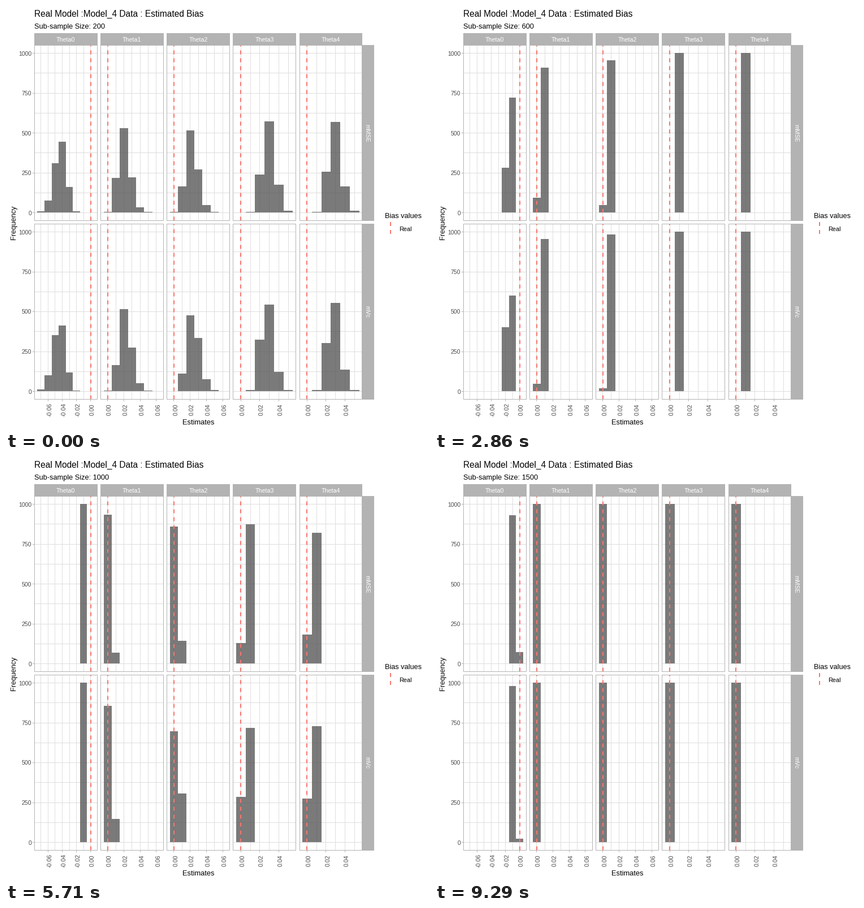
A matplotlib script that plays this animation: 748 by 748 pixels, repeating every 10 s.

```python
import math

import matplotlib.pyplot as plt
from matplotlib.animation import FuncAnimation
from matplotlib.collections import LineCollection, PolyCollection
from matplotlib.patches import Rectangle

plt.rcParams["font.family"] = ["Liberation Sans", "DejaVu Sans"]

SIDE, DPI = 748, 100
PX = 72 / DPI
FRAMES, LOOP = 200, 10000
SIZES = range(200, 1600, 100)

# Panel layout in pixels, y pointing down
LEFT, TOP, WIDTH, HEIGHT = 50.45, 69.4, 110.6, 310.2
STEP_X, STEP_Y = 117.15, 316
ZERO_Y, PER_COUNT = 365.5, 0.282
ROWS = ["mMSE", "mVc"]
# First and last bin edge of each column, in hundredths
RANGES = [(-7.5, 0.5), (-0.5, 6.5), (-0.5, 6.5), (-0.5, 5.5), (-0.5, 5.5)]

# The root of the bias is normal: its centre falls with the sub-sample
# size as sqrt(LEVEL / size), and its spread as SPREAD / size.
LEVEL = [[853, 402, 430, 584, 577], [885, 431, 467, 552, 560]]
DRIFT = [0.01, 0.003, 0.003, 0.025, 0.032]
SPREAD = [40, 49.5, 49.5, 36.5, 36.5]

GREY, GRID, RED = "#b3b3b3", "#dedede", "#f8766d"
INK, TICK_INK = "#000000", "#4d4d4d"


def histogram(row, col, size):
    """Pairs of bin centre (in hundredths) and count out of 1000."""
    level = LEVEL[row][col] * (size / 200) ** -DRIFT[col]
    centre, spread = math.sqrt(level / size), SPREAD[col] / size
    sign = -1 if col == 0 else 1
    below = 0
    for k in range(8):
        z = (math.sqrt(k + 0.5) - centre) / spread
        share = 0.5 * (1 + math.erf(z / math.sqrt(2)))
        yield sign * k, round(1000 * (share - below))
        below = share


def x_pos(col, value):
    lo, hi = RANGES[col]
    scale = WIDTH / (1.1 * (hi - lo))
    return LEFT + STEP_X * col + (value - lo + 0.05 * (hi - lo)) * scale


def y_pos(row, count):
    return ZERO_Y + STEP_Y * row - count * PER_COUNT


def bars(size):
    shapes = []
    for row in range(2):
        base = math.floor(y_pos(row, 0))
        for col in range(5):
            for k, count in histogram(row, col, size):
                if count < 1:
                    continue
                x0, x1 = round(x_pos(col, k - 0.5)), round(x_pos(col, k + 0.5))
                top = min(math.floor(y_pos(row, count)), base - 1)
                shapes.append([(x0, base), (x0, top), (x1, top), (x1, base)])
    return shapes


def mid(v):
    """Centre of the pixel that holds v, for crisp thin lines."""
    return math.floor(v) + 0.5


fig = plt.figure(figsize=(SIDE / DPI, SIDE / DPI), dpi=DPI, facecolor="white")
ax = fig.add_axes([0, 0, 1, 1])
ax.set_xlim(0, SIDE)
ax.set_ylim(SIDE, 0)
ax.axis("off")
grid, ticks = [], []


def label(x, y, text, px, color=INK, ha="left", va="baseline", turn=0):
    return ax.text(x, y, text, fontsize=px * PX, color=color, ha=ha, va=va,
                   rotation=turn, zorder=6)


def strip(x0, y0, x1, y1):
    ax.add_patch(Rectangle((x0, y0), x1 - x0, y1 - y0, fc=GREY, lw=0,
                           zorder=1, snap=False))


def dashes(x, y0, y1):
    x = round(x)
    ax.plot([x, x], [y0, y1], color=RED, lw=2 * PX, zorder=4, snap=False,
            linestyle=(0, (3.5, 3.5)), dash_capstyle="butt")


def draw_panel(row, col):
    x0, y0 = mid(LEFT + STEP_X * col), mid(TOP + STEP_Y * row)
    x1 = mid(LEFT + STEP_X * col + WIDTH)
    y1 = mid(TOP + STEP_Y * row + HEIGHT)
    lo, hi = RANGES[col]
    for count in range(0, 1001, 125):
        gy = mid(y_pos(row, count))
        grid.append([(x0, gy), (x1, gy)])
    for value in range(math.ceil(lo), math.floor(hi) + 1):
        x = x_pos(col, value)
        grid.append([(mid(x), y0), (mid(x), y1)])
        if row == 1 and value % 2 == 0:
            ticks.append([(mid(x), y1), (mid(x), y1 + 3.5)])
            label(x + 3.2, 714, f"{value / 100:.2f}", 10.6, TICK_INK,
                  "center", "center", 90)
    dashes(x_pos(col, 0), y1, y0)
    ax.add_patch(Rectangle((x0, y0), x1 - x0, y1 - y0, fill=False, ec=GREY,
                           lw=PX, zorder=5, snap=False))


for row, name in enumerate(ROWS):
    y = TOP + STEP_Y * row
    for col in range(5):
        draw_panel(row, col)
    for count in range(0, 1001, 250):
        ty = y_pos(row, count)
        ticks.append([(47, mid(ty)), (50, mid(ty))])
        label(45.2, ty + 4, str(count), 10.5, TICK_INK, "right")
    strip(630, math.floor(y), 651, math.floor(y + HEIGHT) + 1)
    label(638.5, y + HEIGHT / 2, name, 10.5, "white", "center", "center", -90)

for col in range(5):
    x = LEFT + STEP_X * col
    strip(math.floor(x), 48, math.floor(x + WIDTH) + 1, 70)
    label(x + WIDTH / 2, 63, f"Theta{col}", 10.6, "white", "center")

label(50, 19, "Real Model :Model_4 Data : Estimated Bias", 15.55)
subtitle = label(50, 40, "", 12.8)
label(340.5, 740, "Estimates", 12.9, ha="center")
label(14, 382.5, "Frequency", 12.8, ha="center", va="center", turn=90)
label(670, 375, "Bias values", 12.7)
dashes(680.5, 403, 382)
label(695.5, 398, "Real", 10.9)

for segments, color in ((grid, GRID), (ticks, GREY)):
    ax.add_collection(LineCollection(segments, colors=color, linewidths=PX,
                                     capstyle="butt", zorder=2, snap=False),
                      autolim=False)
columns = PolyCollection([], facecolors="#595959", alpha=0.8, linewidths=0,
                         zorder=3, snap=False)
ax.add_collection(columns, autolim=False)


def draw(i):
    # A size that is due within this short frame already shows
    size = SIZES[((i + 1) * len(SIZES) - 1) // FRAMES]
    columns.set_verts(bars(size))
    subtitle.set_text(f"Sub-sample Size: {size}")
    return columns, subtitle


anim = FuncAnimation(fig, draw, frames=FRAMES, interval=LOOP // FRAMES,
                     repeat=True, repeat_delay=0, blit=False)
plt.show()
```
